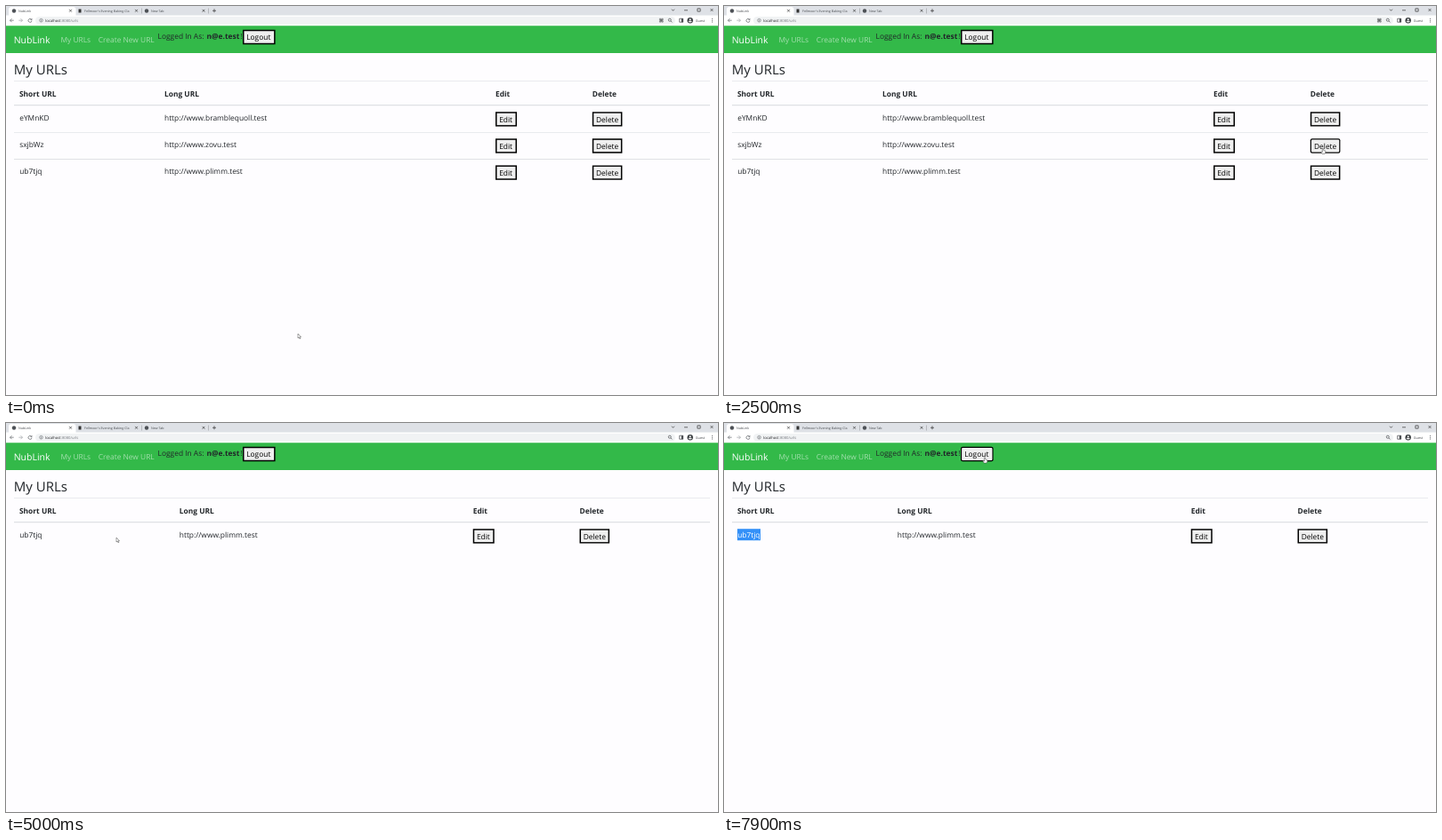
An HTML page with a canvas for the animation above (8 s loop, 800 by 438 pixels).

```html
<!DOCTYPE html>
<html lang="en">
<head>
<meta charset="utf-8">
<title>Short links</title>
<style>
  html, body { margin: 0; width: 100%; height: 100%; overflow: hidden; background: #fefdff; }
  canvas { display: block; }
</style>
</head>
<body>
<canvas width="800" height="438"></canvas>
<script>
const ctx = document.querySelector('canvas').getContext('2d');
const LOOP = 8000, STEP = 100, INK = '#212529';
const APP = 'NubLink';

const LINKS = [
  ['eYMnKD', 'http://www.bramblequoll.test'],
  ['sxjbWz', 'http://www.zovu.test'],
  ['ub7tjq', 'http://www.plimm.test'],
];

// Pointer path: time, x, y of the tip
const PATH = [
  [0, 328, 369], [100, 335, 369], [900, 681, 361], [1300, 798.5, 325], [1900, 675, 184],
  [2300, 673, 160], [2700, 673, 160], [3100, 673, 144], [3500, 679, 129],
  [4200, 679, 129], [4500, 657, 130], [4700, 657, 130], [4800, 420, 98],
  [5000, 124, 129], [5200, 120, 129], [6000, 20, 126], [6300, 11, 124.5],
  [7000, 11, 124.5], [7700, 293, 38.5], [8000, 293, 38.5],
];

function text(str, x, y, size = 8.4, color = INK, weight = 400) {
  ctx.font = `${weight} ${size}px "Open Sans", sans-serif`;
  ctx.fillStyle = color;
  ctx.fillText(str, x, y);
}

function rect(x, y, w, h, color, radius = 0) {
  ctx.fillStyle = color;
  ctx.beginPath();
  ctx.roundRect(x, y, w, h, radius);
  ctx.fill();
}

function dot(x, y, r, color) {
  rect(x - r, y - r, 2 * r, 2 * r, color, r);
}

function stroke(d, x, y, color = '#5f6368', width = 0.7) {
  ctx.save();
  ctx.translate(x, y);
  ctx.strokeStyle = color;
  ctx.lineWidth = width;
  ctx.stroke(new Path2D(d));
  ctx.restore();
}

function button(label, x, y, w, focused) {
  rect(x, y, w, 16.4, '#000', focused ? 2 : 0);
  if (focused) rect(x + 1.2, y + 1.2, w - 2.4, 14, '#fff', 1);
  const edge = focused ? 2 : 1.5;
  rect(x + edge, y + edge, w - 2 * edge, 16.4 - 2 * edge, '#efefef');
  text(label, x + 4.2, y + 11.4, 8.4, '#000');
}

function browser(loaded) {
  const cross = 'M-1.4-1.4L1.4 1.4M1.4-1.4L-1.4 1.4';
  rect(0, 0, 800, 11, '#dee1e6');
  rect(3, 1, 75.5, 12, '#fff', 3);
  rect(0, 10.5, 800, 12, '#fff');

  const tabs = [[APP, 9], ["Fellmoor's Evening Baking Cla", 83], ['New Tab', 158]];
  tabs.forEach(([title, x], i) => {
    if (i === 1) rect(x - 1.5, 3.5, 3, 4, '#333');
    else dot(x, 5.5, 2.2, '#4d5156');
    text(title, x + 5, 6.8, 3.65, '#45494d');
    stroke(cross, [72.5, 146.5, 222][i], 5.3, '#333');
  });
  rect(152, 2.5, 0.6, 6, '#9a9da1');
  rect(227, 2.5, 0.6, 6, '#9a9da1');
  stroke('M-2 0H2M0-2V2', 234, 5.3, '#333');
  stroke('M-1.5-.8L0 .8L1.5-.8', 749.5, 4.5, '#333');
  stroke('M-2 0H2', 764, 4.8, '#333');
  stroke('M-1.6-1.6H1.6V1.6H-1.6Z', 778.5, 4.5, '#333');
  stroke(cross, 793, 4.5, '#333');

  stroke('M2.2 0H-2M0-2L-2 0L0 2', 6.5, 16.2);
  stroke('M-2.2 0H2M0-2L2 0L0 2', 16.5, 16.2, '#a0a3a7');
  stroke('M1.6-1.1A2 2 0 1 0 2 .4M2-2.2V-.6H.4', 27, 16.2);
  rect(33, 12, 719, 8.6, '#f1f3f4', 4.3);
  stroke('M-1.8 0A1.8 1.8 0 1 0 1.8 0A1.8 1.8 0 1 0-1.8 0M0-.3V1M0-1V-.7', 39.5, 16.2, '#5f6368', 0.6);
  text('localhost', 44.2, 17.9, 4.2, '#202124');
  text(':8080/urls', 61.8, 17.9, 4.2, '#777b80');

  if (!loaded) {
    stroke('M-1.9-1.9H-.5V1.9H-1.9V.5H1.9V1.9H.5V-1.9H1.9V-.5H-1.9Z', 736.3, 16.2, '#44474b', 0.6);
  }
  stroke('M-2-.5A1.5 1.5 0 1 0 1-.5A1.5 1.5 0 1 0-2-.5M.7.7L2.2 2.2', 746.3, 16.2, '#44474b');
  stroke('M-2-2H2V2H-2Z', 758.7, 16.2, '#44474b');
  rect(758.8, 14.2, 2, 4, '#44474b');
  dot(768.7, 16.2, 3.2, '#3c4043');
  dot(768.7, 15.2, 1, '#fff');
  rect(766.9, 16.8, 3.6, 1.4, '#fff', 0.7);
  text('Guest', 774.8, 17.6, 3.8, '#44474b');
  for (const y of [14.5, 16.2, 17.9]) dot(793.5, y, 0.5, '#44474b');
}

function navbar(focused) {
  const faded = 'rgba(255,255,255,.55)';
  rect(0, 22.3, 800, 30.7, '#33b949');
  text(APP, 8.7, 42, 10.5, '#fff');
  text('My URLs', 61.5, 41.2, 8.4, faded);
  text('Create New URL', 103.8, 41.2, 8.4, faded);
  text('Logged In As:', 170.6, 36.8);
  text('n@e.test', 225.6, 36.8, 8.4, INK, 700);
  text('!', 263.2, 36.8);
  button('Logout', 266, 26.8, 36.6, focused);
}

function table(links, focusedRow, selected) {
  const [longX, editX, deleteX] = links.length > 1 ? [178, 550, 658.8] : [194.8, 524.7, 644.5];
  text('My URLs', 8.8, 77.2, 15, INK, 500);
  rect(9, 84.2, 782, 0.6, '#d5d9dd');
  const heads = [['Short URL', 15], ['Long URL', longX], ['Edit', editX], ['Delete', deleteX]];
  for (const [head, x] of heads) text(head, x, 101.6, 8.4, INK, 700);
  rect(9, 111.2, 782, 1, '#d5d9dd');

  links.forEach(([code, url], i) => {
    const y = 119.2 + 30.1 * i;
    if (i) rect(9, y - 7.4, 782, 0.7, '#d5d9dd');
    if (selected) rect(15, y, 26, 13, '#3390f8');
    text(code, 15.2, y + 10, 8.4, selected ? '#fff' : INK);
    text(url, longX, y + 10);
    button('Edit', editX, y, 24, false);
    button('Delete', deleteX, y, 33.6, i === focusedRow);
  });
}

function pointer(t) {
  const i = Math.max(1, PATH.findIndex(p => p[0] >= t));
  const [t0, x0, y0] = PATH[i - 1], [t1, x1, y1] = PATH[i];
  const k = (t - t0) / (t1 - t0);
  const hand = (t >= 1900 && t < 2800) || (t >= 3600 && t < 4400) || t >= 7700;
  const shape = new Path2D(hand
    ? 'M-.6 .4Q0-.4 .6 .4V2.4L2.8 3V5L2 6.6H-.9L-2.2 4.2L-1.6 3.7L-.6 4.5Z'
    : 'M0 0V5L1.2 4L2 5.8L2.8 5.4L2 3.7H3.5Z');
  ctx.save();
  ctx.translate(x0 + (x1 - x0) * k, y0 + (y1 - y0) * k);
  ctx.fillStyle = '#fff';
  ctx.fill(shape);
  ctx.strokeStyle = '#444';
  ctx.lineWidth = 0.5;
  ctx.stroke(shape);
  ctx.restore();
}

function draw(now) {
  const t = Math.floor(now % LOOP / STEP) * STEP;
  const links = t < 2700 ? LINKS : t < 4000 ? [LINKS[0], LINKS[2]] : [LINKS[2]];
  const focusedRow = t >= 2500 && t < 2700 ? 1 : t >= 3800 && t < 4000 ? 0 : -1;
  ctx.textRendering = 'geometricPrecision';
  rect(0, 0, 800, 438, '#fefdff');
  browser(t >= 2700);
  navbar(t >= 7900);
  table(links, focusedRow, t >= 6700);
  pointer(t);
  requestAnimationFrame(draw);
}
requestAnimationFrame(draw);
</script>
</body>
</html>
```
